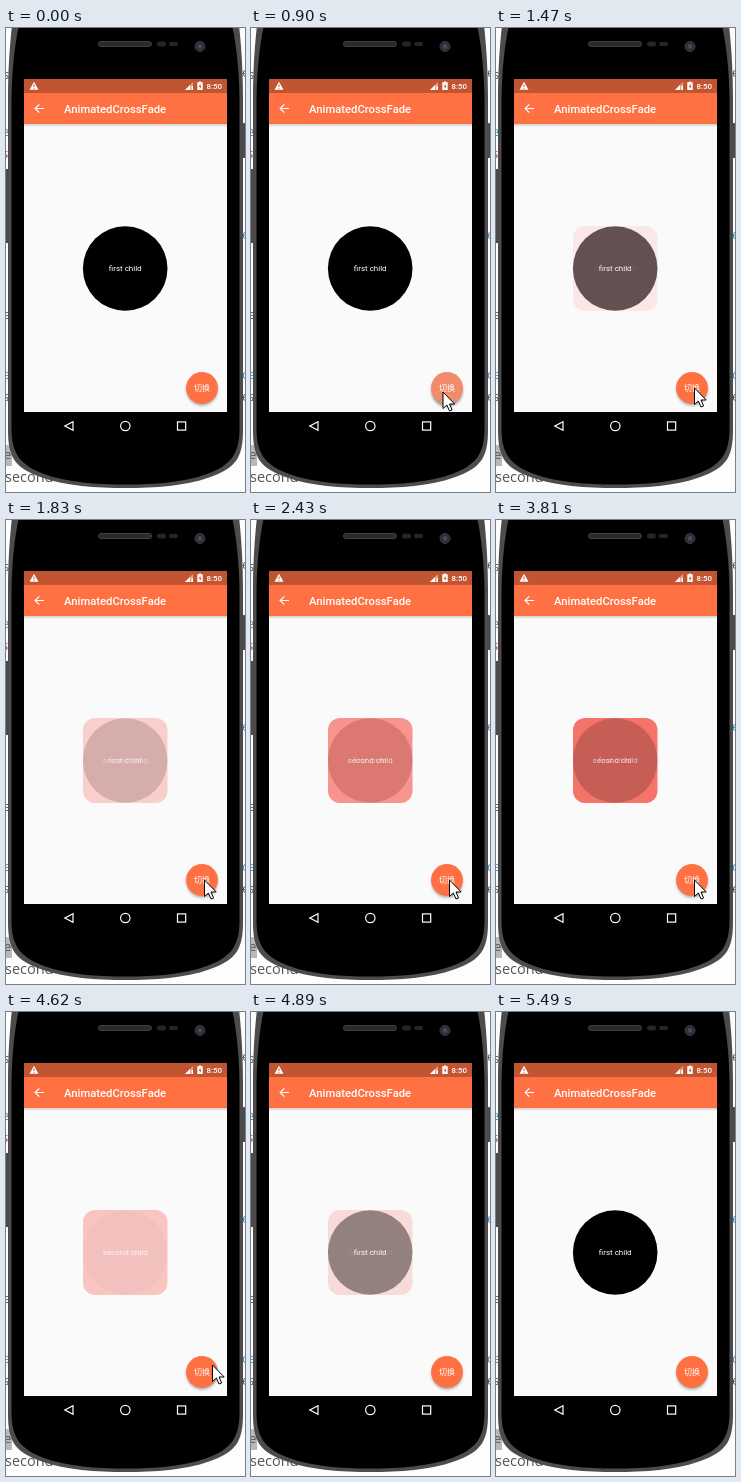
Animation, 239 px wide and 464 px high, one loop 5.7 s. Source, as an HTML page:

```html
<!DOCTYPE html>
<html lang="zh">
<head>
<meta charset="utf-8">
<title>AnimatedCrossFade</title>
<style>
  html, body { margin: 0; width: 100%; height: 100%; overflow: hidden; background: #fdfdfd; }
  svg { display: block; width: 239px; height: 464px; }
  text { font-family: Roboto, "Noto Sans CJK SC", "Noto Sans CJK", sans-serif; }
  .page text { font-family: "Open Sans", "Noto Sans", sans-serif; font-size: 13px; fill: #555; }
  .page .link { fill: #3a8fc4; }
  .label { font-size: 8px; fill: #fff; text-anchor: middle; }
</style>
</head>
<body>
<svg viewBox="0 0 239 464">
  <defs>
    <filter id="blur" x="-50%" y="-50%" width="200%" height="200%"><feGaussianBlur stdDeviation="1.5"/></filter>
    <linearGradient id="barShade" x2="0" y2="1">
      <stop stop-color="#000" stop-opacity=".18"/><stop offset="1" stop-color="#000" stop-opacity="0"/>
    </linearGradient>
    <clipPath id="screen"><rect x="18" y="51" width="203" height="333"/></clipPath>
    <g id="half">
      <path d="M6-3C4 15 2 40 2 70V402C2 430 9 440 36 449.500C60 458 90 460 120 460V-3Z" fill="#4c4c4c"/>
      <path d="M13-3C9 15 6 40 5.500 70V400C5.500 426 14 437 38 446C62 454.500 90 456.500 120 456.500V-3Z"/>
    </g>
  </defs>

  <g class="page">
    <text x="-3" y="51">s</text>
    <text x="-4" y="108" class="link">e</text>
    <text x="-4" y="130" style="fill:#a33">s</text>
    <text x="-3" y="291">e</text>
    <text x="-3" y="351" class="link">e</text>
    <text x="-3" y="373">s</text>
    <text x="236" y="49">e</text>
    <text x="236" y="211" class="link">e</text>
    <text x="236" y="351" class="link">c</text>
    <text x="236" y="373">e</text>
    <rect y="417" width="6" height="21" fill="#b9b9b9"/>
    <text x="-2" y="431">e</text>
    <text x="-1" y="454" style="font-size:14.500px">second</text>
  </g>

  <rect x="-2" y="141" width="6" height="74" rx="2" fill="#4b4b4b"/>
  <rect x="234" y="95" width="6" height="35" rx="2" fill="#4b4b4b"/>
  <use href="#half"/>
  <use href="#half" transform="matrix(-1 0 0 1 239 0)"/>
  <rect x="92.500" y="13.500" width="53" height="5" rx="2.500" fill="#2a2a2a" stroke="#404040"/>
  <g fill="#262626">
    <rect x="151" y="13.500" width="9" height="5" rx="2.500"/>
    <rect x="163" y="14" width="9" height="4" rx="2"/>
  </g>
  <circle cx="194" cy="18.500" r="5" fill="#2b2d33" stroke="#3c3e45"/>
  <circle cx="194" cy="18.500" r="2.400" fill="#444a5c"/>

  <g clip-path="url(#screen)">
    <rect x="18" y="51" width="203" height="333" fill="#fafafa"/>
    <rect x="18" y="96" width="203" height="3" fill="url(#barShade)"/>
    <rect x="18" y="65" width="203" height="31" fill="#ff7043"/>
    <rect x="18" y="51" width="203" height="14" fill="#c15532"/>

    <path d="M28 53.700L32.500 61.700H23.500Z" fill="#fff"/>
    <path d="M28 56.500V59M28 59.800V60.800" stroke="#c15532"/>
    <path d="M187 54V62H179Z" fill="#fff" opacity=".45"/>
    <path d="M184 57V62H179ZM185.500 58H187V62H185.500Z" fill="#fff"/>
    <path d="M193 53.500H195V54.300H196.700V62H191.300V54.300H193Z" fill="#fff"/>
    <path d="M194.500 55.500L192.700 58.700H193.900V61L195.500 57.900H194.400Z" fill="#c15532"/>
    <text x="200.500" y="61" font-size="7.9" font-weight="500" fill="#fff">8:50</text>

    <path d="M38 80.500H29.500M33.300 76.300L29.100 80.500L33.300 84.700" fill="none" stroke="#fff" stroke-width="1.200"/>
    <text x="58" y="84.500" font-size="11.280" font-weight="500" fill="#fff">AnimatedCrossFade</text>

    <g id="children">
      <g id="second">
        <rect x="77" y="198" width="84.500" height="85" rx="12" fill="#f44336"/>
        <text class="label" x="119.200" y="243">second child</text>
      </g>
      <g id="first">
        <circle cx="119.200" cy="240.500" r="42.300"/>
        <text class="label" x="119.200" y="243">first child</text>
      </g>
    </g>

    <circle id="shadow" cx="196" cy="362" r="15.500" filter="url(#blur)"/>
    <circle cx="196" cy="360" r="15.900" fill="#ff7043"/>
    <circle id="press" cx="196" cy="360" r="15.900" fill="#ccc"/>
    <text class="label" x="196" y="363">切换</text>
  </g>

  <g fill="none" stroke="#fff" stroke-width="1.200">
    <path d="M67 393.700V402.300L58.800 398Z"/>
    <circle cx="119.300" cy="398" r="4.700"/>
    <rect x="171.500" y="393.900" width="8.200" height="8.200"/>
  </g>

  <path id="cursor" d="M0 0V16.500L3.900 13L6.500 19L9.100 18L6.500 12H11.700Z" fill="#fff" stroke="#000" stroke-width="1"/>
</svg>

<script>
const LOOP = 5700, STEP = 30, FADE = 3000;
const START = 840, REVERSE = 3285, SETTLED = 5490;

// Rows: time, then values
const cursorPath = [
  [120, 240, 220], [240, 233, 280], [420, 220, 403], [540, 203, 382], [660, 192, 364],
  [1000, 192, 364], [1380, 198.500, 360], [4260, 198.500, 360], [4620, 206.500, 353], [4800, 241, 330]
];
const pressSteps = [
  [810, 0], [900, 1], [990, 1], [1320, 0], [3120, 0], [3210, 1], [3290, 1], [3480, 0]
];

const el = id => document.getElementById(id);
const children = el("children"), first = el("first"), second = el("second");
const cursor = el("cursor"), press = el("press"), shadow = el("shadow");

function sample(rows, time) {
  const next = rows.findIndex(row => row[0] > time);
  if (next === 0) return rows[0].slice(1);
  if (next < 0) return rows[rows.length - 1].slice(1);
  const a = rows[next - 1], b = rows[next];
  const k = (time - a[0]) / (b[0] - a[0]);
  return a.slice(1).map((v, i) => v + (b[i + 1] - v) * k);
}

function bounceOut(t) {
  const g = 7.5625, d = 2.75;
  if (t < 1 / d) return g * t * t;
  if (t < 2 / d) return g * (t - 1.5 / d) ** 2 + 0.75;
  if (t < 2.5 / d) return g * (t - 2.25 / d) ** 2 + 0.9375;
  return g * (t - 2.625 / d) ** 2 + 0.984375;
}

// cubic-bezier(.42, 0, .58, 1)
function easeInOut(x) {
  let lo = 0, hi = 1;
  for (let i = 0; i < 20; i++) {
    const s = (lo + hi) / 2, r = 1 - s;
    if (1.26 * r * r * s + 1.74 * r * s * s + s ** 3 < x) lo = s; else hi = s;
  }
  return lo * lo * (3 - 2 * lo);
}

function progress(time) {
  if (time < START || time >= SETTLED) return 0;
  const turn = Math.min(time, REVERSE);
  return Math.max(0, (turn - START - (time - turn)) / FADE);
}

function draw(time) {
  const t = progress(time);
  first.style.opacity = 1 - bounceOut(t);
  second.style.opacity = easeInOut(t);
  const top = time >= START && time < REVERSE ? second : first;
  if (children.lastElementChild !== top) children.append(top);

  const [down] = sample(pressSteps, time);
  press.style.opacity = 0.3 * down;
  shadow.style.opacity = 0.32 + 0.1 * down;
  shadow.setAttribute("cy", 362 + down);

  const [x, y] = sample(cursorPath, time);
  cursor.setAttribute("transform", `translate(${x} ${y})`);
}

const begin = performance.now();
function tick() {
  const time = (performance.now() - begin) % LOOP;
  draw(Math.floor(time / STEP) * STEP);
  requestAnimationFrame(tick);
}
tick();
</script>
</body>
</html>
```
